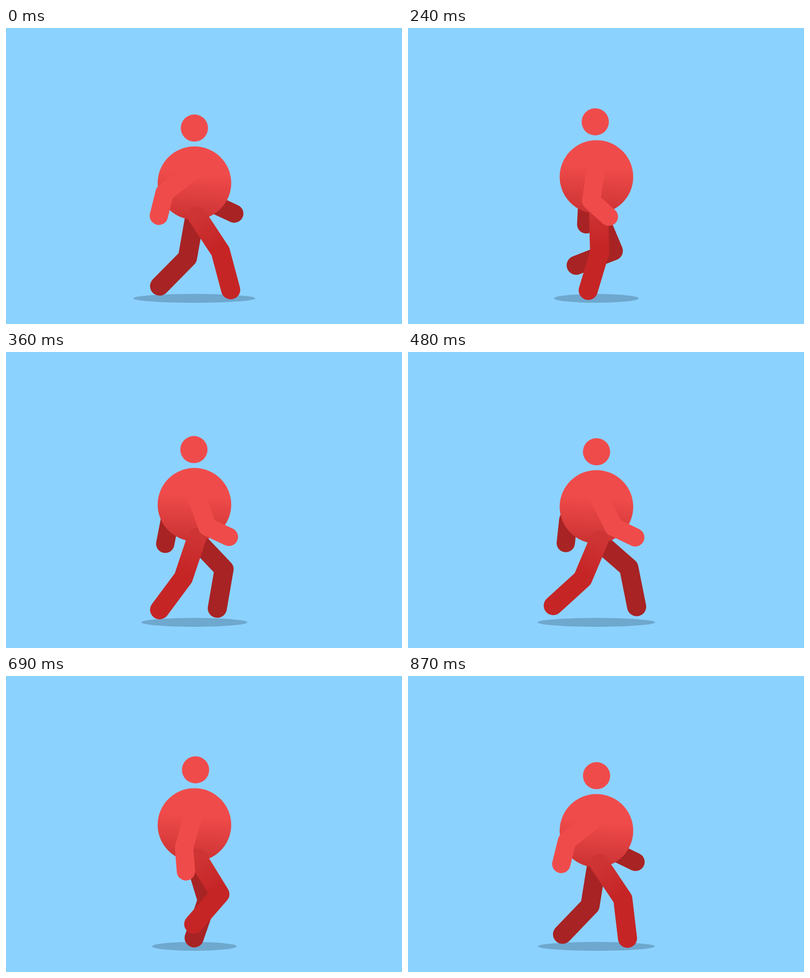
Animation of 800 by 600 pixels, one loop 0.9 s. Source, as an HTML page:

```html
<!DOCTYPE html>
<html lang="en">
<head>
<meta charset="utf-8">
<title>Walk cycle</title>
<style>
  html, body { margin: 0; width: 100%; height: 100%; overflow: hidden; background: #8cd2ff; }
  svg { display: block; width: 800px; height: 600px; }
  polyline { fill: none; stroke-linecap: round; stroke-linejoin: round; }
  .arm { stroke-width: 37px; }
  .leg { stroke-width: 38.6px; }
  .far { stroke: #a82324; }
</style>
</head>
<body>
<svg viewBox="0 0 800 600">
  <defs>
    <linearGradient id="bellyFill" gradientUnits="userSpaceOnUse" x1="1.4" y1="-20" x2="-5" y2="75">
      <stop offset="0" stop-color="#f04b4b"/>
      <stop offset="1" stop-color="#cb3232"/>
    </linearGradient>
    <linearGradient id="thighFill" gradientUnits="userSpaceOnUse">
      <stop offset="0" stop-color="#cf3434"/>
      <stop offset="0.85" stop-color="#c62526"/>
    </linearGradient>
  </defs>
  <rect width="800" height="600" fill="#8cd2ff"/>
  <ellipse id="shadow" cx="380.5" cy="548" ry="9" fill="#6ea8cf"/>
  <polyline id="farArm" class="arm far"/>
  <polyline id="farLeg" class="leg far"/>
  <circle id="belly" r="74.3" fill="url(#bellyFill)"/>
  <polyline id="nearLeg" class="leg" stroke="url(#thighFill)"/>
  <polyline id="nearArm" class="arm" stroke="#f04b4b"/>
  <circle id="head" r="27.5" fill="#f04b4b"/>
</svg>
<script>
const LOOP = 900, STEP = 30;
const $ = id => document.getElementById(id);

const linear = u => u;
const smooth = u => u * u * (3 - 2 * u);
const easeIn = u => u * u * (2 - u);
const easeOut = u => 1 - easeIn(1 - u);

// Keys are [time, value, easing towards the next key]; the last one wraps to the first.
function track(keys, t) {
  let i = keys.length - 1;
  while (keys[i][0] > t) i--;
  const [t0, v0, ease = smooth] = keys[i];
  const [t1, v1] = keys[i + 1] || [LOOP, keys[0][1]];
  return v0 + (v1 - v0) * ease((t - t0) / (t1 - t0));
}

const lift = [[0, 0], [240, 1], [450, 0], [690, 1]];
const squeeze = lift.map(([t, v]) => [t, v, linear]);
const sway = [[0, 0, linear], [240, -2.3, linear], [450, 0, linear], [690, 2.3, linear]];

// Angles in degrees from straight down, positive to the right.
const nearArm = {
  len: [76.8, 48],
  swing: [[0, -52.2], [450, 28]],
  bend: [[0, 38.3], [240, 56], [450, 38], [690, 20.7]]
};
const farArm = {
  len: [78, 48],
  swing: [[0, 28], [450, -48]],
  bend: [[0, 37], [240, 11], [450, 41], [690, 37]]
};
const nearLeg = {
  len: [86, 80.5],
  swing: [[0, 33.3], [450, -24.5], [750, 38]],
  bend: [[0, -18.4], [450, -18, linear], [690, -72.5, easeIn]]
};
const farLeg = {
  len: [86, 80.5],
  swing: [[0, -9.9], [450, 49.5]],
  bend: [[0, -34.6, linear], [240, -91.5, easeOut], [450, -37.5]]
};

function reach([x, y], len, deg) {
  const a = deg * Math.PI / 180;
  return [x + len * Math.sin(a), y + len * Math.cos(a)];
}

function set(id, attrs) {
  for (const k in attrs) $(id).setAttribute(k, attrs[k]);
}

function drawLimb(id, limb, root, t) {
  const a = track(limb.swing, t);
  const mid = reach(root, limb.len[0], a);
  const end = reach(mid, limb.len[1], a + track(limb.bend, t));
  set(id, { points: [root, mid, end].map(p => p.map(n => n.toFixed(2)).join()).join(' ') });
  return mid;
}

function draw(t) {
  const up = track(lift, t), side = track(sway, t);
  const y = 314.3 - 12.6 * up;
  const shoulder = [381, y - 27.3];
  const hip = [386 + side * 0.5, 381 - 12.2 * up];

  set('shadow', { rx: 123.5 - 38 * track(squeeze, t) });
  set('belly', { transform: `translate(380.7 ${y})` });
  set('head', { cx: 380.6 + side, cy: y - 111.5 });

  drawLimb('farArm', farArm, shoulder, t);
  drawLimb('farLeg', farLeg, [381.5, 381 - 8.5 * up], t);
  const knee = drawLimb('nearLeg', nearLeg, hip, t);
  set('thighFill', { x1: hip[0], y1: hip[1], x2: knee[0], y2: knee[1] });
  drawLimb('nearArm', nearArm, shoulder, t);
}

const start = performance.now();
function tick() {
  const t = (performance.now() - start) % LOOP;
  draw(Math.floor(t / STEP) * STEP);
  requestAnimationFrame(tick);
}
tick();
</script>
</body>
</html>
```
